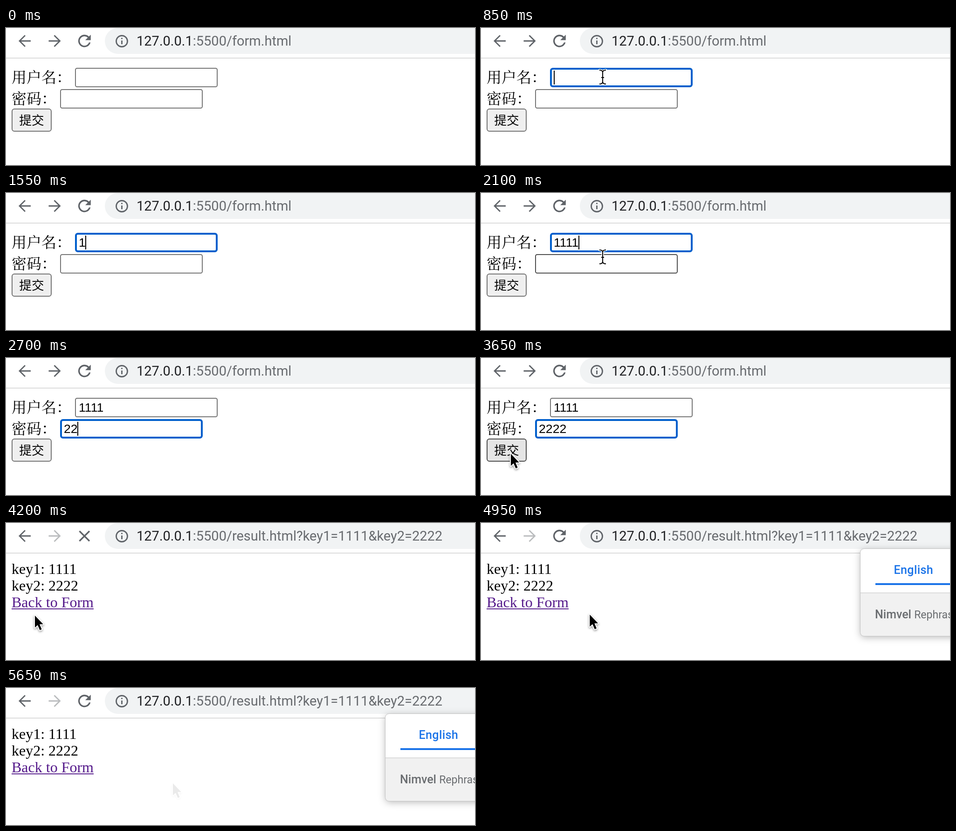
Write an HTML page that moves like this. It is 1006x296 px and loops after 6.5 s.

```html
<!DOCTYPE html>
<html lang="zh-CN">
<head>
<meta charset="utf-8">
<title>Form demo</title>
<style>
html, body { margin: 0; width: 100%; height: 100%; overflow: hidden; background: #fff; }
svg { display: block; width: 1006px; height: 296px; }
text { white-space: pre; }
.icon { fill: none; stroke: #5f6368; stroke-width: 2.8; }
.url { font: 29px Roboto, sans-serif; fill: #686b6f; }
.host { fill: #202124; }
.label { font: 32px "Noto Serif CJK SC", "Noto Sans CJK SC", "Noto Sans CJK", serif; }
.btn { font: 26.67px "Noto Sans CJK SC", "Noto Sans CJK", sans-serif; }
.value { font: 26.67px "Liberation Sans", Arial, sans-serif; font-kerning: none; }
.page { font: 32px "Liberation Serif", "Times New Roman", serif; }
.card { fill: #fff; stroke: #c6c6c6; filter: drop-shadow(0 1px 2px rgba(0,0,0,.2)); }
.bubble { filter: drop-shadow(0 3px 8px rgba(0,0,0,.28)); }
.tab { font: 500 25px Roboto, sans-serif; letter-spacing: .4px; fill: #1a73e8; }
.brand { font: 500 25px Roboto, sans-serif; fill: #6a6d70; }
.brand .thin { font-weight: 400; font-size: 23px; }
.arrow { fill: #000; stroke: #fff; stroke-width: 4; stroke-linejoin: round; paint-order: stroke;
  filter: drop-shadow(0 2px 2px rgba(0,0,0,.4)); }
.beam path { fill: none; stroke: #000; stroke-width: 2; }
.beam path:first-child { stroke: #fff; stroke-width: 5; stroke-linecap: round; }
</style>
</head>
<body>
<svg viewBox="0 0 1006 296">
  <defs>
    <path id="back" d="M53 28H29M41 16L29 28L41 40"/>
    <path id="ibeam" d="M-7-15Q0-15 0-10Q0-15 7-15M0-10V10M-7 15Q0 15 0 10Q0 15 7 15M-3 1H3"/>
  </defs>

  <g id="toolbar">
    <rect x="212" y="0" width="900" height="56" rx="28" fill="#f1f3f4"/>
    <rect x="0" y="64" width="1006" height="2" fill="#dcdcdc"/>
    <use href="#back" class="icon"/>
    <use href="#back" class="icon" id="forward" transform="translate(144.5 0) scale(-1 1)"/>
    <path id="reload" fill="#5f6368" transform="translate(148.2 7.8) scale(1.68)"
      d="M17.65 6.35A8 8 0 1 0 19.73 14H17.65A6 6 0 1 1 16.22 7.78L13 11H20V4Z"/>
    <path id="stop" class="icon" style="stroke-width:3.2" d="M157.500 17.500L179 39M179 17.500L157.500 39"/>
    <circle cx="248.500" cy="28.500" r="12" class="icon"/>
    <path d="M248.500 27V35M248.500 21.300V24.100" class="icon"/>
    <text x="280" y="38" class="url"><tspan class="host">127.0.0.1</tspan><tspan id="path"></tspan></text>
  </g>

  <g id="form">
    <text x="12" y="118" class="label">用户名：</text>
    <text x="12" y="164" class="label">密码：</text>
    <g id="fields"></g>
    <rect id="button" x="13" y="175" width="84" height="48" rx="5" stroke-width="2"/>
    <text x="55" y="208.500" text-anchor="middle" class="btn">提交</text>
    <rect id="caret" width="2" height="30"/>
    <rect id="card" class="card" width="383" height="105" rx="4"/>
  </g>

  <g id="result" class="page">
    <text x="12" y="110">key1: 1111</text>
    <text x="12" y="146">key2: 2222</text>
    <text x="12" y="182" fill="#551a8b">Back to Form</text>
    <rect x="12" y="184.500" width="176" height="2" fill="#551a8b"/>
  </g>

  <g id="bubble">
    <rect class="bubble" x="814" y="56" width="260" height="188" rx="8" fill="#fff"/>
    <path d="M814 151H1010V244H822Q814 244 814 236Z" fill="#f1f1f1"/>
    <rect x="814" y="150" width="192" height="2" fill="#dcdcdc"/>
    <rect x="813.500" y="55.500" width="260" height="189" rx="8" fill="none" stroke="#c4c4c4"/>
    <text x="885.500" y="110" class="tab">English</text>
    <rect x="846" y="130" width="160" height="4" fill="#1a73e8"/>
    <text x="845" y="206" class="brand">Nimvel <tspan class="thin">Rephrase</tspan></text>
  </g>

  <g id="cursor">
    <path id="arrow" class="arrow" d="M0 0V26L5.800 20.400L10.600 31.500L14.600 29.800L10 18.800H17.800Z"/>
    <g id="beam" class="beam"><use href="#ibeam" style="fill:none;stroke:#fff;stroke-width:5;stroke-linecap:round"/><use
      href="#ibeam" style="fill:none;stroke:#000;stroke-width:2"/></g>
  </g>
</svg>

<script>
const LOOP = 6500, STEP = 50;
const PRESS = 3950, NAVIGATE = 4050, LOADED = 4300;
const DIGIT = 14.83, TIGHT = 1.98;

const $ = id => document.getElementById(id);
const show = (id, on) => $(id).setAttribute('visibility', on ? 'inherit' : 'hidden');
const set = (el, attrs) => { for (const k in attrs) el.setAttribute(k, attrs[k]); };
const within = (t, [a, b]) => t >= a && t < b;

const fields = [
  { x: 148, y: 86, textX: 156, digit: '1', gap: -TIGHT, keys: [1500, 1700, 1850, 1950],
    focus: [850, 2350], blinkFrom: 600, card: [1050, 1500] },
  { x: 116, y: 132, textX: 124, digit: '2', gap: 0, keys: [2600, 2700, 2950, 3050],
    focus: [2350, PRESS], blinkFrom: 2350, card: [2450, 2600] }
];

// time, x, y
const mouse = [
  [200, 164, 238], [400, 164, 238], [450, 176, 224], [500, 212, 188], [550, 252, 114], [600, 261, 106],
  [2000, 261, 106], [2050, 261, 118], [2100, 261, 138], [2200, 261, 153], [3150, 261, 153],
  [3200, 241, 156], [3300, 218, 172], [3400, 160, 198], [3500, 96, 212], [3600, 66, 209], [3650, 64, 207],
  [3900, 64, 207], [3950, 62, 202], [4050, 62, 200], [4450, 62, 200], [4500, 67, 201], [4800, 67, 201],
  [4850, 100, 202], [5000, 300, 196], [5150, 434, 188], [5300, 434, 188], [5350, 425, 190],
  [5550, 362, 205], [5650, 358, 206]
];
const away = [[0, 200], [1500, 2050], [2600, 3200]];

function along(track, t) {
  const i = track.findIndex(k => k[0] > t);
  if (i < 0) return track[track.length - 1].slice(1);
  if (i === 0) return track[0].slice(1);
  const a = track[i - 1], b = track[i], p = (t - a[0]) / (b[0] - a[0]);
  return [1, 2].map(n => a[n] + (b[n] - a[n]) * p);
}

function make(tag, attrs) {
  const el = document.createElementNS('http://www.w3.org/2000/svg', tag);
  set(el, attrs);
  return $('fields').appendChild(el);
}

for (const f of fields) {
  f.box = make('rect', { fill: '#fff' });
  f.text = make('text', { x: f.textX, y: f.y + 30, class: 'value', 'letter-spacing': f.gap });
}

const inside = (x, y, l, t, w, h) => x >= l && x <= l + w && y >= t && y <= t + h;

function drawField(f, t, hover) {
  const focused = within(t, f.focus);
  const line = focused ? 4 : 2;
  set(f.box, {
    x: f.x + line / 2, y: f.y + line / 2, width: 306 - line, height: 42 - line,
    rx: focused ? 4 : 3.5, 'stroke-width': line,
    stroke: focused ? '#005fcc' : hover ? '#4f4f4f' : '#767676'
  });
  const typed = f.keys.filter(k => k <= t);
  const n = typed.length;
  f.text.textContent = f.digit.repeat(n);

  if (focused) {
    const since = t - (n ? typed[n - 1] : f.blinkFrom);
    const end = f.textX + n * DIGIT + Math.max(0, n - 1) * f.gap;
    set($('caret'), { x: Math.floor(end), y: f.y + 6 });
    show('caret', Math.floor(since / 500) % 2 === 0);
  }
  if (within(t, f.card)) {
    set($('card'), { x: f.x + .5, y: f.y + 44.5 });
    show('card', true);
  }
}

function draw(time) {
  const t = Math.floor((time % LOOP) / STEP) * STEP;
  const done = t >= NAVIGATE, loading = done && t < LOADED;
  const [x, y] = along(mouse, t);
  const seen = !away.some(r => within(t, r));

  show('form', !done);
  show('result', done);
  show('reload', !loading);
  show('stop', loading);
  $('forward').style.stroke = done ? '#babcbe' : '#5f6368';
  $('path').textContent = done ? ':5500/result.html?key1=1111&key2=2222' : ':5500/form.html';
  $('bubble').setAttribute('opacity', t < 4250 ? 0 : t < LOADED ? .6 : 1);

  let overField = false;
  if (!done) {
    show('caret', false);
    show('card', false);
    for (const f of fields) {
      const hover = seen && inside(x, y, f.x, f.y, 306, 42);
      overField = overField || hover;
      drawField(f, t, hover);
    }
    const hot = seen && inside(x, y, 12, 174, 86, 50), down = hot && t >= PRESS;
    set($('button'), {
      fill: down ? '#f5f5f5' : hot ? '#e5e5e5' : '#efefef',
      stroke: down ? '#8d8d8d' : hot ? '#4f4f4f' : '#767676'
    });
  } else {
    show('caret', false);
    show('card', false);
  }

  show('cursor', seen);
  show('arrow', !overField);
  $('beam').style.display = overField ? '' : 'none';
  $('arrow').style.display = overField ? 'none' : '';
  const fade = Math.min(1, Math.max(0, (t - 5450) / 200));
  set($('cursor'), { transform: `translate(${x} ${y})`, opacity: 1 - .92 * fade });
}

const start = performance.now();
function tick() {
  draw(performance.now() - start);
  requestAnimationFrame(tick);
}
tick();
</script>
</body>
</html>
```
